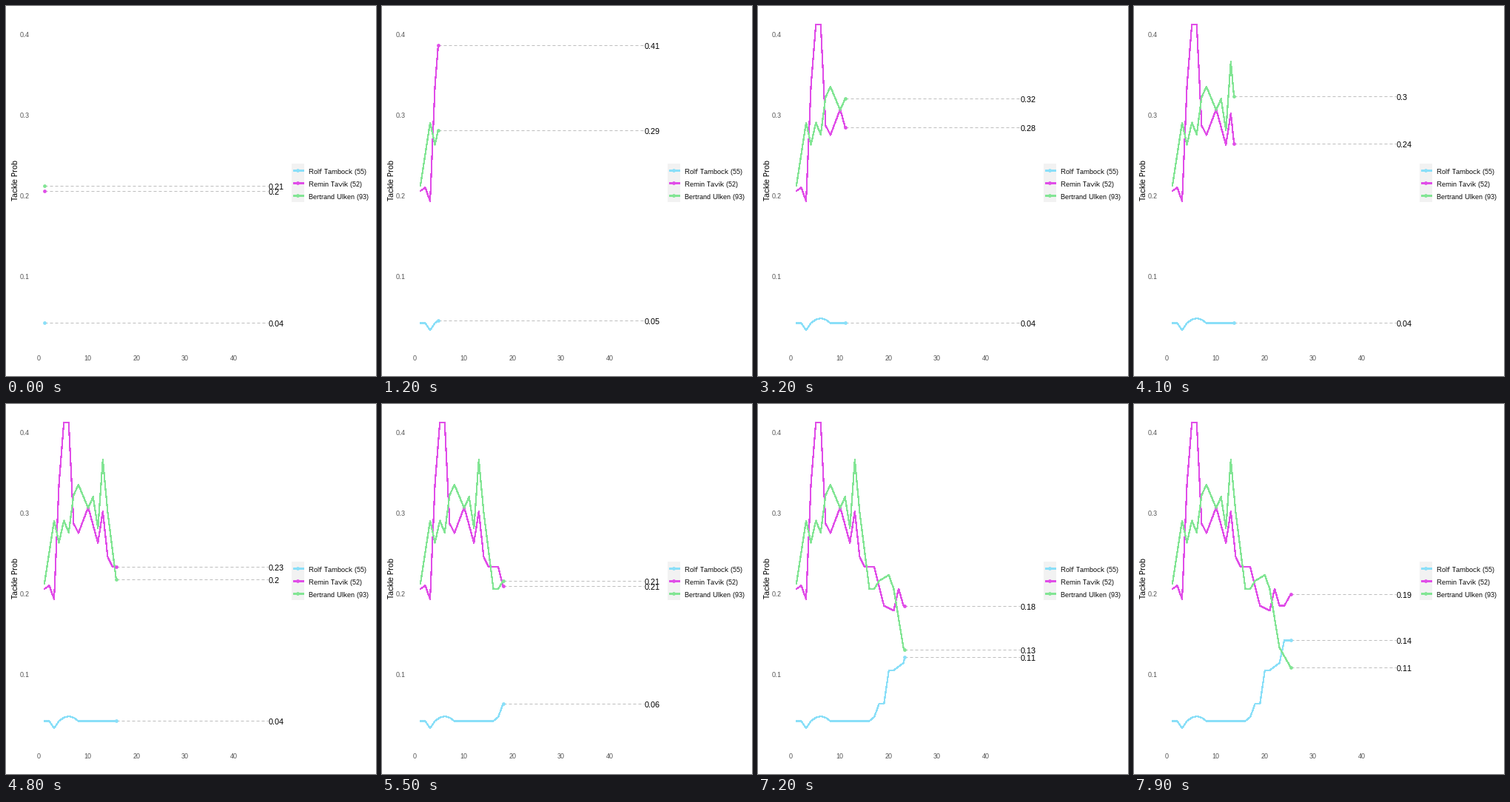
These frames come from a looping animation (500 px wide and 500 px high, 8000 ms). A matplotlib script:

```python
import numpy as np
import matplotlib.pyplot as plt
from matplotlib.animation import FuncAnimation
from matplotlib.patches import Rectangle

SIZE, DPI = 500, 100
PT = 72 / DPI                # points per pixel
FRAMES, INTERVAL = 80, 100
LAST_X = 47                  # full extent of the reveal
STEPS = 149                  # frames needed to reach LAST_X

plt.rcParams.update({
    "font.family": "Liberation Sans",
    "text.hinting": "native",
    "text.hinting_factor": 1,
})

XS = np.arange(1, 27)
KEYS = np.floor((XS - 1) * STEPS / (LAST_X - 1) + 0.5)   # frame reaching each x


def bends(*points):
    """Straight runs between the turning points of a curve."""
    return np.interp(XS, *zip(*points))


def staircase():
    """Flat start with a dip and a swell, then stepwise climbs."""
    swell = 0.006 * np.sin(np.pi * np.clip((XS - 4) / 4, 0, 1))
    ramp = 0.0045 * np.clip(XS - 21, 0, 2)
    steps = sum(size * (XS >= start) for start, size in
                ((17, 0.005), (18, 0.0165), (20, 0.0415), (24, 0.028)))
    return 0.041 - 0.009 * (XS == 3) + swell + ramp + steps


PLAYERS = [
    ("Rolf Tambock (55)", "#8ADFF8", staircase()),
    ("Remin Tavik (52)", "#E04DE8", bends(
        (1, .2047), (2, .209), (3, .192), (4, .335), (5, .411), (6, .411),
        (7, .286), (8, .274), (10, .306), (12, .262), (13, .301), (14, .2447),
        (15, .232), (17, .232), (19, .184), (21, .178), (22, .205),
        (23, .184), (24, .184), (26, .2055))),
    ("Bertrand Ulken (93)", "#82E594", bends(
        (1, .211), (3, .2895), (4, .262), (5, .2895), (6, .2747), (7, .321),
        (8, .334), (10, .305), (11, .319), (12, .28), (13, .365), (14, .3),
        (16, .2047), (17, .2047), (18, .2148), (20, .222), (21, .2047),
        (23, .132), (26, .1))),
]


def px(x):
    return 45.3 + 6.577 * x


def py(v):
    return 473.1 - 1090 * v


fig = plt.figure(figsize=(SIZE / DPI, SIZE / DPI), dpi=DPI, facecolor="white")
ax = fig.add_axes([0, 0, 1, 1])
ax.set_xlim(0, SIZE)
ax.set_ylim(SIZE, 0)
ax.axis("off")


def text(x, y, s, size, color="black", **kw):
    return ax.text(x, y, s, fontsize=size * PT, color=color,
                   va="baseline", **kw)


def line(xs, ys, color):
    # aliased strokes fill every touched pixel, so 1.2 px renders as 2 px
    return ax.plot(xs, ys, color=color, lw=1.2 * PT, antialiased=False,
                   zorder=2, solid_capstyle="butt",
                   solid_joinstyle="round")[0]


def dot(x, y, color):
    return ax.plot([x], [y], "o", color=color, ms=4.8 * PT, mew=0,
                   antialiased=False, zorder=4)[0]


# Axes
for v in (0.1, 0.2, 0.3, 0.4):
    text(32, round(py(v) + 4.9), f"{v:.1f}", 9, "#4D4D4D", ha="right")
for x in range(0, 41, 10):
    text(px(x) - 0.7, 479, str(x), 9, "#4D4D4D", ha="center")
text(16, 235.5, "Tackle Prob", 11, rotation=90, rotation_mode="anchor",
     ha="center")

# Legend
ax.add_patch(Rectangle((386, 213), 17, 52, fc="#F2F2F2", ec="none"))
for i, (name, color, _) in enumerate(PLAYERS):
    y = 222 + 17 * i
    line([388, 402], [y, y], color)
    dot(394, y, color)
    text(409, y + 5, name, 9.1)


class Series:
    """One revealed curve with its end dot, guide line and value label."""

    def __init__(self, color, values):
        self.values = values
        self.curve = line([], [], color)
        self.guide = ax.plot([], [], color="#BEBEBE", lw=PT, zorder=3,
                             dashes=(4, 3), dash_capstyle="butt")[0]
        self.dot = dot(0, 0, color)
        self.label = text(px(LAST_X) - 0.3, 0, "", 11, zorder=5)

    def update(self, frame):
        x = np.interp(frame, KEYS, XS)
        v = np.interp(frame, KEYS, self.values)
        done = KEYS < frame
        self.curve.set_data(px(np.append(XS[done], x)),
                            py(np.append(self.values[done], v)))
        self.guide.set_data([px(x), px(LAST_X)], [py(v)] * 2)
        self.dot.set_data([px(x)], [py(v)])
        nearest = self.values[int(np.floor(x + 0.5 + 1e-9)) - 1]
        self.label.set_text(f"{round(nearest, 2):g}")
        self.label.set_y(round(py(v) + 5))
        return self.curve, self.guide, self.dot, self.label


series = [Series(color, values) for _, color, values in PLAYERS]


def update(frame):
    return [artist for s in series for artist in s.update(frame)]


anim = FuncAnimation(fig, update, frames=FRAMES, interval=INTERVAL,
                     init_func=lambda: update(0), repeat=True, repeat_delay=0)
plt.show()
```
